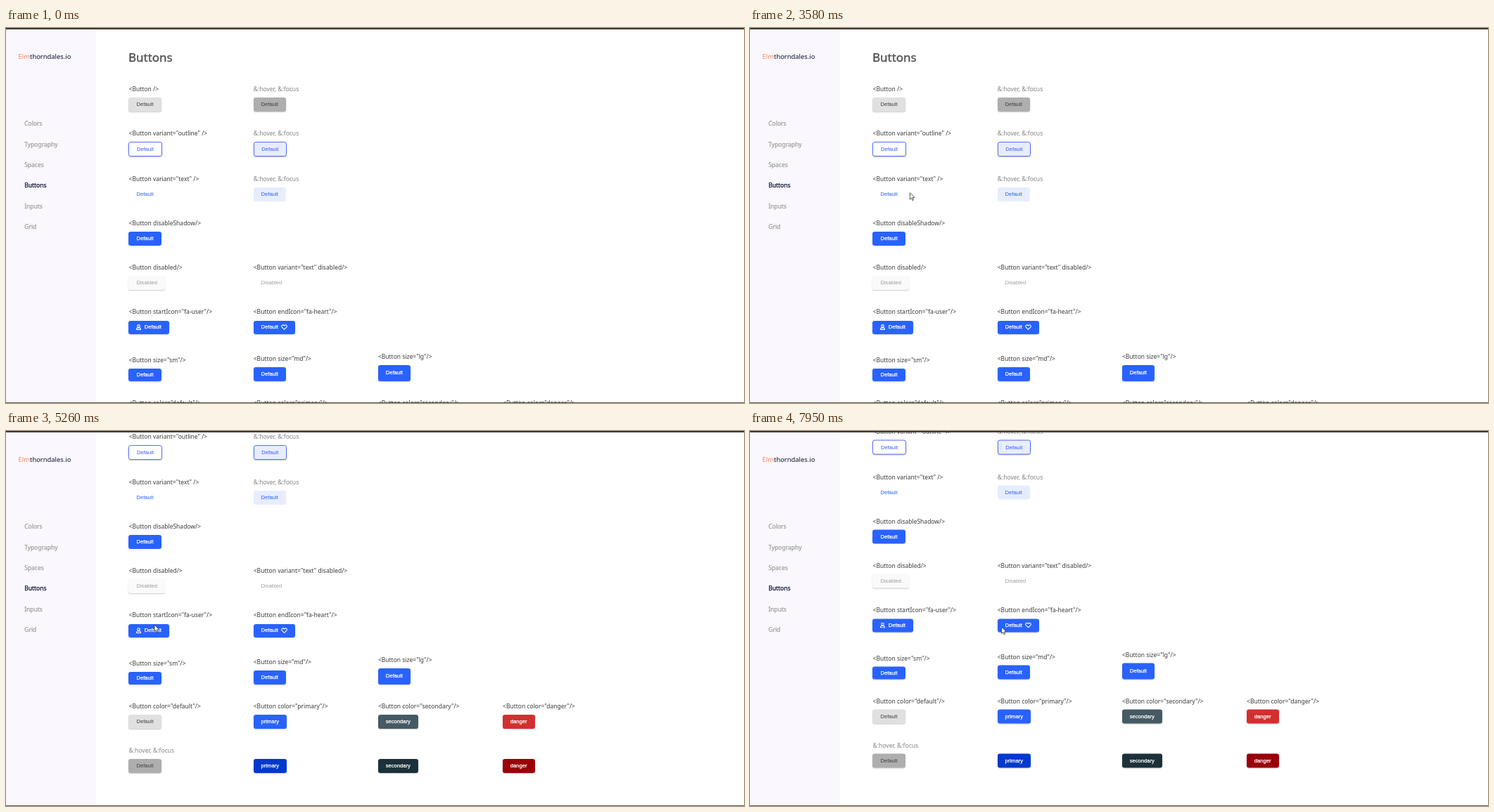
Recreate the animation shown at these times as an HTML page. Size 1049x534 px, loop 8 s.

```html
<!DOCTYPE html>
<html lang="en">
<head>
<meta charset="utf-8">
<title>Buttons</title>
<style>
  html, body { margin: 0; width: 100%; height: 100%; overflow: hidden; background: #fff; }
  body { position: relative; font: 8.5px/12px "Noto Sans", "Open Sans", sans-serif; color: #3a3a3a; }
  body > *, body > * > * { position: absolute; white-space: pre; }
  #side { left: 0; top: 0; width: 128px; height: 100%; background: #faf8fe; }
  #logo { left: 17.6px; top: 35px; font-size: 9.4px; font-weight: 500; color: #090f31; }
  #logo span { color: #f0875a; }
  .nav { color: #9e9e9e; -webkit-text-stroke: .25px; }
  .nav.on { color: #090f31; }
  #page { left: 0; top: 0; width: 100%; height: 700px; }
  h1 { left: 174px; top: 30px; margin: 0; font-size: 17px; line-height: 24px; font-weight: 400; color: #4f4f4f; -webkit-text-stroke: .35px; }
  .note { color: #828282; }
  .btn {
    box-sizing: border-box; display: flex; align-items: center; gap: 4.3px;
    padding: 0 11px; border-radius: 3.3px;
    font: 7.65px/10px "Liberation Sans", Arial, sans-serif;
    box-shadow: 0 1px 1.6px rgba(51, 51, 51, .25);
  }
  .solid { -webkit-text-stroke: .25px; }
  .outline { border: 1px solid #4f6dfe; padding: 0 10.6px; }
  .flat { box-shadow: none; }
  .btn svg { fill: none; stroke: #fff; stroke-width: 1.1; }
  #top { left: 0; top: 0; width: 100%; height: 1.5px; background: #3a3a3c; }
  #bottom { left: 0; bottom: 0; width: 100%; height: 1px; background: #58585a; }
  #cursor { left: 0; top: 0; overflow: visible; }
</style>
</head>
<body>
<div id="page"><h1>Buttons</h1></div>
<div id="side"><div id="logo"><span>Elm</span>thorndales.io</div></div>
<div id="top"></div>
<div id="bottom"></div>
<svg id="cursor" width="8" height="12">
  <path d="M0 0V9.4L2.1 7.5L3.6 10.9L5.1 10.2L3.7 6.9L6.7 6.7Z" fill="#fff" stroke="#2b2b2b" stroke-width=".8"/>
</svg>
<script>
const $ = id => document.getElementById(id);
const page = $('page'), side = $('side'), cursor = $('cursor');

function add(parent, cls, text, x, y) {
  const el = document.createElement('div');
  el.className = cls;
  el.textContent = text;
  el.style.left = x + 'px';
  el.style.top = y + 'px';
  return parent.appendChild(el);
}

['Colors', 'Typography', 'Spaces', 'Buttons', 'Inputs', 'Grid'].forEach((name, i) =>
  add(side, name === 'Buttons' ? 'nav on' : 'nav', name, 26.2, 130.4 + i * 29.3));

// Skin: background, hover background, ink, class
const SKINS = {
  default: ['#e0e0e0', '#aeaeae', '#3f3f3f', ''],
  outline: ['#fff', '#e7edff', '#3d5afe', 'outline'],
  text: ['transparent', '#e7edff', '#2962ff', 'flat'],
  disabled: ['#fafafa', '#fafafa', '#9e9e9e', ''],
  disabledText: ['transparent', 'transparent', '#9e9e9e', 'flat'],
  primary: ['#2962ff', '#0039cb', '#fff', 'solid'],
  noShadow: ['#2962ff', '#0039cb', '#fff', 'solid flat'],
  secondary: ['#455a64', '#1c313a', '#fff', 'solid'],
  danger: ['#d32f2f', '#9a0007', '#fff', 'solid']
};

const icon = (w, d) => `<svg width="${w}" height="8"><path d="${d}"/></svg>`;
const USER = icon(7, 'M3.5 .6a1.75 1.75 0 1 1 0 3.5a1.75 1.75 0 1 1 0-3.5ZM.6 7.4V6.6Q.6 4.9 2.3 4.9H4.7Q6.4 4.9 6.4 6.6V7.4Z');
const HEART = icon(9, 'M4.5 7.3L1.2 4C-.4 2.2 2.2-.6 4.5 1.8C6.8-.6 9.4 2.2 7.8 4Z');

const cell = (props, skin, more) => ({ label: `<Button${props}/>`, skin, text: 'Default', h: 19.7, ...more });
const hovered = (skin, more) => cell('', skin, { label: '&:hover, &:focus', on: true, ...more });

const tall = { h: 21.1 };
const heights = { sm: 17.5, md: 19.7, lg: 23 };
const colors = ['default', 'primary', 'secondary', 'danger'];
const caption = color => color === 'default' ? 'Default' : color;

const ROWS = [
  [cell(' ', 'default'), hovered('default')],
  [cell(' variant="outline" ', 'outline', tall), hovered('outline', tall)],
  [cell(' variant="text" ', 'text'), hovered('text')],
  [cell(' disableShadow', 'noShadow')],
  [cell(' disabled', 'disabled', { text: 'Disabled' }),
   cell(' variant="text" disabled', 'disabledText', { text: 'Disabled' })],
  [cell(' startIcon="fa-user"', 'primary', { before: USER }),
   cell(' endIcon="fa-heart"', 'primary', { after: HEART })],
  Object.keys(heights).map(size => cell(` size="${size}"`, 'primary', { h: heights[size] })),
  colors.map(c => cell(` color="${c}"`, c, { text: caption(c) })),
  colors.map((c, i) => hovered(c, { text: caption(c), ...(i && { label: '' }) }))
];

const live = [];

function place(c, x, bottom) {
  const [bg, hover, ink, cls] = SKINS[c.skin];
  const y = bottom - c.h;
  add(page, c.on ? 'note' : '', c.label, x + .2, y - 18.1);
  const el = add(page, 'btn ' + cls, c.text, x, y);
  el.insertAdjacentHTML('afterbegin', c.before || '');
  el.insertAdjacentHTML('beforeend', c.after || '');
  Object.assign(el.style, { height: c.h + 'px', color: ink, background: c.on ? hover : bg });
  if (!c.on) live.push({ el, x, y, w: el.offsetWidth, h: c.h, bg, hover });
}

// Rows stack downwards; cells in a row share their bottom edge
let bottom = 55.6;
for (const row of ROWS) {
  bottom += 43.5 + Math.max(...row.map(c => c.h));
  row.forEach((c, i) => place(c, 174.4 + i * 177.15, bottom));
}

const LOOP = 8000, STEP = 67.5, LAG = 70, DEPTH = 149.4;
const clamp = u => Math.min(1, Math.max(0, u));
const hold = (t, from) => from + Math.floor((t - from) / STEP) * STEP;

// Pointer moves: start, end, target x and y, optional bend x and y
const ENTRY = [968.5, 498];
const MOVES = [
  [120, 510, 285.5, 92],
  [770, 1120, 205, 107],
  [1650, 2390, 203, 178, 325, 130],
  [2480, 3230, 275, 219, 500, 40],
  [3300, 3920, 205, 242],
  [4440, 4580, 351, 243],
  [4850, 5120, 211, 276],
  [5255, 5610, 208, 157],
  [5670, 5870, 208, 152],
  [6130, 6880, 294, 223, 362, 216],
  [6950, 7750, 340, 281, 107, 290],
  [7820, 7950, 357.5, 279]
];

function pointer(t) {
  let [x, y] = ENTRY;
  for (const [from, to, tx, ty, bx = (x + tx) / 2, by = (y + ty) / 2] of MOVES) {
    if (t < from) break;
    const at = t < to ? hold(t, from) : to;
    const u = 1 - (1 - (at - from) / (to - from)) ** 2;
    const curve = (a, b, c) => (1 - u) ** 2 * a + 2 * u * (1 - u) * b + u * u * c;
    x = curve(x, bx, tx);
    y = curve(y, by, ty);
  }
  return [x, y];
}

function scroll(t) {
  const u = clamp((hold(t, 5120) - 5070) / 214);
  return DEPTH * u * u * (3 - 2 * u);
}

function draw(t) {
  page.style.transform = `translateY(${-scroll(t)}px)`;
  const [cx, cy] = pointer(t);
  cursor.style.transform = `translate(${cx}px, ${cy}px)`;
  cursor.style.visibility = t < MOVES[0][0] ? 'hidden' : 'visible';

  // Hover follows the pointer a little late and rests while the page scrolls
  const [hx, hy] = pointer(t - LAG), s = scroll(t - LAG);
  const still = s === 0 || s === DEPTH;
  for (const b of live) {
    const dx = hx - b.x, dy = hy + s - b.y;
    const over = still && dx >= 0 && dx < b.w && dy >= 0 && dy < b.h;
    b.el.style.background = over ? b.hover : b.bg;
  }
}

function tick() {
  draw(performance.now() % LOOP);
  requestAnimationFrame(tick);
}
tick();
</script>
</body>
</html>
```
